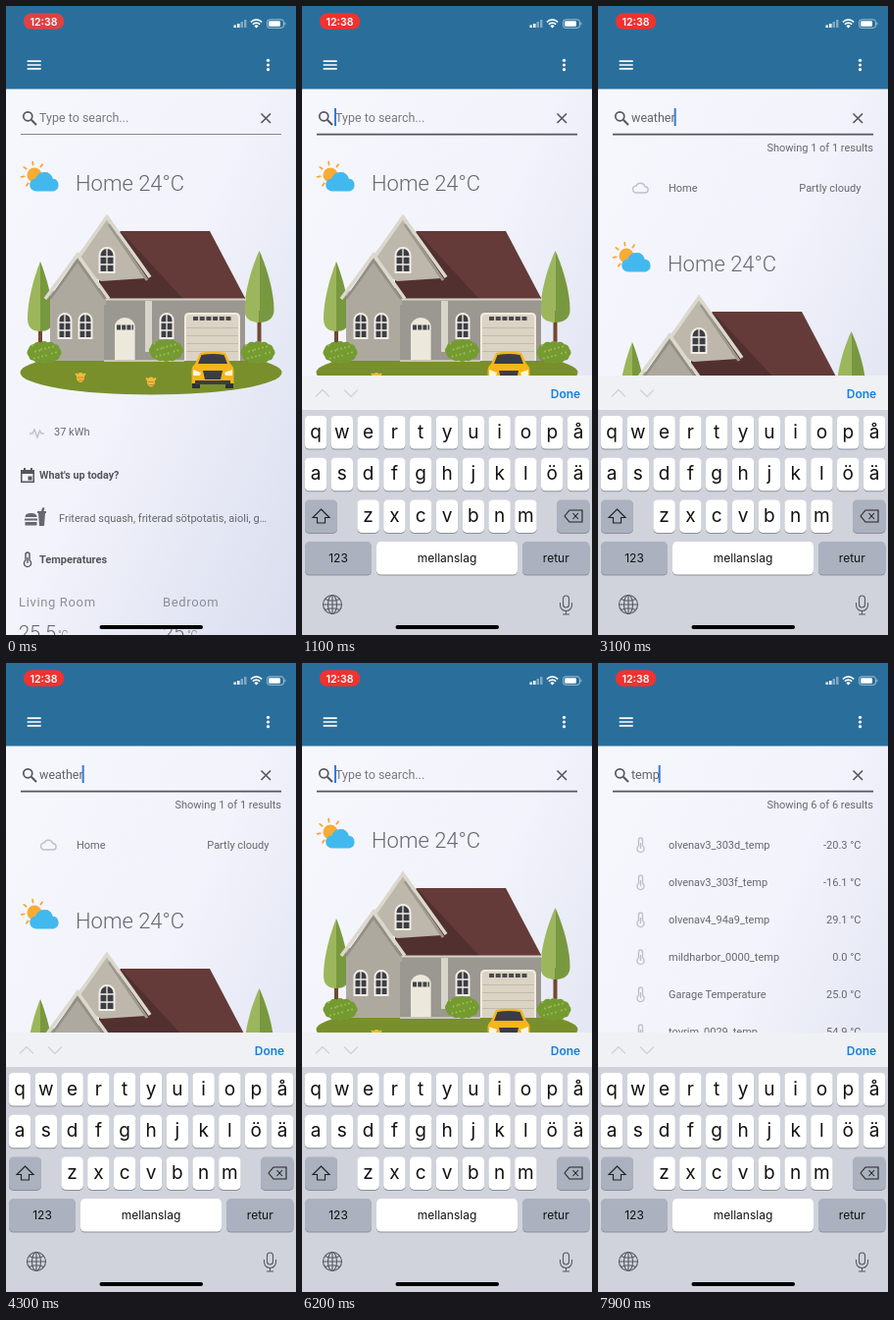
These frames come from a looping animation (296x640 px, 8000 ms). An HTML page:

```html
<!DOCTYPE html>
<html lang="sv">
<head>
<meta charset="utf-8">
<style>
html, body { margin: 0; height: 100%; overflow: hidden; }
svg { display: block; width: 296px; height: 640px; font: 11px Roboto, sans-serif; fill: #66686f; }
.ios { font-family: Inter, sans-serif; }
.line { fill: none; stroke: #bfc1c8; stroke-width: 1.4; }
.dark { stroke: #54565c; }
.end { text-anchor: end; }
.mid { text-anchor: middle; }
</style>
</head>
<body>
<svg viewBox="0 0 296 640">
  <defs>
    <linearGradient id="bg" x1="0" y1="0" x2="1" y2="1">
      <stop offset="0" stop-color="#f7f8fd"/><stop offset=".5" stop-color="#f2f3fb"/><stop offset="1" stop-color="#d9ddee"/>
    </linearGradient>
    <filter id="shadow" x="-30%" y="-30%" width="160%" height="160%">
      <feDropShadow dx="0" dy="1" stdDeviation="1" flood-opacity=".35"/>
    </filter>
  </defs>
  <rect width="296" height="640" fill="url(#bg)"/>

  <g id="home">
    <g stroke="#f7a832" stroke-width="1.8" stroke-linecap="round" id="rays"></g>
    <circle cx="29" cy="172" r="7.5" fill="#f9ab34"/>
    <path fill="#42b9ee" d="M31 188.500a6.500 6.500 0 0 1-.5-13a9 9 0 0 1 17.300.2a6.500 6.500 0 0 1 .7 12.800z"/>
    <text x="71" y="187.500" font-size="22" font-weight="300">Home 24°C</text>

    <ellipse cx="148" cy="373" rx="133.500" ry="22.500" fill="#788f2b"/>
    <g id="trees"></g>
    <path fill="#aea99f" d="M45 290H101V361H45z"/>
    <path fill="#9b9791" d="M100 296H244V361H100z"/>
    <path fill="#643b39" d="M117 229H208L245 299H95V270z"/>
    <path fill="#523030" d="M117 229L182 299H95V270z"/>
    <path fill="#d8d4ca" d="M100 297.500H245V299.500H100zM142 300H149V352H142z"/>
    <path fill="#bdb8ab" d="M103 217L143 277L97 280L66 262z"/>
    <path fill="none" stroke="#9d988d" stroke-width="3" d="M105 222L144 279"/>
    <path fill="none" stroke="#dcd8cd" stroke-width="3.500" d="M71 260L103 214.500L147 276"/>
    <path fill="#aea99f" d="M73 255L102 298V304H45V298z"/>
    <path fill="none" stroke="#938e85" stroke-width="2.500" d="M45 298L73 259L101 298"/>
    <path fill="none" stroke="#dcd8cd" stroke-width="3.500" d="M40 298L73 253L105 298"/>
    <g id="windows"></g>
    <path fill="#ece8dc" d="M111 361V326a10.300 9 0 0 1 20.600 0V361z"/>
    <path stroke="#444348" stroke-width="5" stroke-dasharray="4 1.200" d="M113 327H130"/>
    <path fill="#dbd3c4" stroke="#f0ebdf" stroke-width="2" d="M183 361V317Q183 313 187 313H234Q238 313 238 317V361"/>
    <path stroke="#c3baab" d="M184 327.500H237M184 335.500H237M184 343.500H237M184 351.500H237"/>
    <path stroke="#4a494d" stroke-width="4" stroke-dasharray="5 1.700" d="M191 318H231"/>
    <path fill="#c7c4bc" d="M100 360H182V362H100z"/>
    <g id="bushes"></g>

    <path fill="#303036" d="M190 376H198V389H190zM224 376H232V389H224z"/>
    <path fill="#f5b51b" d="M198 353Q211 350.500 224 353L229 364Q233 367 232.500 373V384H189.500V373Q189 367 193 364z"/>
    <path fill="#3b3d45" d="M199.500 355Q211 353 222.500 355L226 364H196zM201 371H221L219 380H203zM193 381H229V385H193z"/>
    <path fill="#fff6d8" d="M191 370L199 373L198 376H191zM231 370L223 373L224 376H231z"/>
    <g id="bees"></g>

    <path class="line" d="M24 435H27L29 431L32 439L34.500 432L36 435H39"/>
    <text x="49" y="437">37 kWh</text>
    <path fill="#54565c" fill-rule="evenodd" d="M15 472H18V470H20V472H25V470H27V472H29V485H15zM16.500 476V483.500H27.500V476zM22.500 478.500H26.500V482.500H22.500z"/>
    <path fill="#66686f" d="M19.500 520Q19.500 516 25.500 516T31.500 520zM19 521.500H32V523.500H19zM19.500 525H31.500V528.500H19.500zM32 514H36L37 510.500H39.500L38.500 514H41V516H40L39 529H34L33 516H32z"/>
    <g font-weight="700" fill="#54565c">
      <text x="34" y="481" font-size="10.800">What's up today?</text>
      <text x="34" y="567">Temperatures</text>
    </g>
    <text x="54" y="525">Friterad squash, friterad sötpotatis, aioli, g…</text>
    <g id="bulb"></g>
    <g font-size="13" letter-spacing=".65" fill="#8c8e96">
      <text x="13" y="611">Living Room</text><text x="160" y="611">Bedroom</text>
    </g>
    <g font-size="20" font-weight="300">
      <text x="13" y="645">25.5</text><text x="160" y="645">25</text>
      <text x="53" y="643" font-size="10">°C</text><text x="185" y="643" font-size="10">°C</text>
    </g>
  </g>

  <g id="results"></g>

  <rect width="296" height="84.500" fill="#2a6f9b"/>
  <rect id="pill" x="17.800" y="7.300" width="41.500" height="16.500" rx="8.200"/>
  <g fill="#fff">
    <text class="ios mid" x="38.500" y="19.500" font-size="10.700" font-weight="600">12:38</text>
    <path d="M21.700 55.300H35.700V56.900H21.700zM21.700 59.200H35.700V60.800H21.700zM21.700 63.100H35.700V64.700H21.700z"/>
    <circle cx="267.500" cy="55.300" r="1.600"/><circle cx="267.500" cy="60" r="1.600"/><circle cx="267.500" cy="64.700" r="1.600"/>
    <path d="M232.500 19.500H235V22H232.500zM236 18H238.500V22H236z"/>
    <path opacity=".4" d="M239.500 16H242V22H239.500zM243 14H245.500V22H243z"/>
    <path d="M255.500 22.500L253.300 20.200Q255.500 18.500 257.700 20.200z"/>
    <path fill="none" stroke="#fff" stroke-width="1.600" d="M251.800 18.700Q255.500 15.500 259.200 18.700M249.800 16.400Q255.500 11.500 261.200 16.400"/>
    <rect x="266.500" y="13.800" width="17" height="8.500" rx="2.500" fill="none" stroke="#fff" opacity=".55"/>
    <rect x="268" y="15.300" width="12" height="5.500" rx="1.200"/><path opacity=".6" d="M284.500 16.300Q286.500 18 284.500 19.800z"/>
  </g>

  <circle id="ripple" cx="265.500" cy="114" r="16" fill="#dfe0e5"/>
  <g class="line dark">
    <circle cx="22.300" cy="112.300" r="4.500" stroke-width="1.700"/>
    <path stroke-width="2" d="M25.800 115.800L31 121"/>
    <path stroke-width="1.600" d="M260.500 109.500L270 119M270 109.500L260.500 119"/>
    <path style="stroke:#85878c;stroke-width:1" d="M15 130.500H281"/>
    <path id="focus" style="stroke-width:1.6"/>
  </g>
  <text id="query" x="34" y="117.500" font-size="12.500"></text>
  <rect id="cursor" y="104" width="2" height="18" fill="#3b78d6"/>

  <g id="keyboard" class="ios mid" fill="#111">
    <path fill="#d0d3db" d="M0 376H296V640H0z"/>
    <path fill="#eff1f5" d="M0 376H296V411H0z"/>
    <path class="line" style="stroke:#d0d3d9" d="M14 397.500L21 390.500L28 397.500M43 390.500L50 397.500L57 390.500"/>
    <text x="269" y="398.500" font-size="12" font-weight="600" fill="#147ee0">Done</text>
    <g id="keys"></g>
    <g class="line" style="stroke:#222;stroke-width:1.1">
      <path d="M19.500 512L28 520.500H23.500V526H15.500V520.500H11z"/>
      <path d="M268 519L273 513H286V525H273zM276.500 516L282 522M282 516L276.500 522"/>
      <g style="stroke:#555960">
        <circle cx="31" cy="609" r="9.500"/><ellipse cx="31" cy="609" rx="4.500" ry="9.500"/>
        <path d="M31 599.500V618.500M21.500 609H40.500M23.500 603.500Q31 607 38.500 603.500M23.500 614.500Q31 611 38.500 614.500"/>
        <rect x="266.500" y="600" width="6" height="12" rx="3"/><path d="M263.500 607V609.500a6 6 0 0 0 12 0V607M269.500 615.500V619M266 619H273"/>
      </g>
    </g>
    <g id="popup" filter="url(#shadow)"><path fill="#fff"/><text font-size="28"></text></g>
  </g>
  <rect x="95.500" y="630" width="105.500" height="4" rx="2" fill="#000"/>
</svg>
<script>
const $ = id => document.getElementById(id);
const text = (x, y, s, attrs = '') => `<text x="${x}" y="${y}" ${attrs}>${s}</text>`;

// Scenery
$('rays').innerHTML = [...Array(8).keys()].map(i =>
  `<path d="M29 161.500V158.500" transform="rotate(${i * 45 - 8} 29 172)"/>`).join('');

const leafHalf = (x, top, w, h, fill) => `<path fill="${fill}" d="M${x} ${top}
  C${x + w * .45} ${top + h * .2} ${x + w} ${top + h * .55} ${x + w} ${top + h * .82}Q${x + w} ${top + h} ${x} ${top + h}z"/>`;
const tree = (x, top, w, h) => `<path fill="#70492f" d="M${x - 2} ${top + h - 12}h4v32h-4z"/>` +
  leafHalf(x, top, -w, h, '#9cb65c') + leafHalf(x, top, w, h, '#78983f');
$('trees').innerHTML = tree(35, 260, 13, 71) + tree(258.5, 249, 15, 73);

const pane = (x, y, w, h) => `
  <path fill="#3d3d44" stroke="#f0eee6" stroke-width="2" d="M${x - w} ${y + h}V${y + w}a${w} ${w} 0 0 1 ${2 * w} 0V${y + h}z"/>
  <path stroke="#f0eee6" stroke-width="1.3" d="M${x} ${y}v${h}M${x - w} ${y + h * .36}h${2 * w}M${x - w} ${y + h * .68}h${2 * w}"/>`;
$('windows').innerHTML = pane(103, 246, 7.5, 25) + [60, 81, 164].map(x => pane(x, 313, 6.5, 25)).join('');

const bush = (x, y) => {
  let out = `<ellipse cx="${x}" cy="${y}" rx="14" ry="10"/>`, dots = '';
  for (let i = 0; i < 12; i++) {
    const a = Math.PI * i / 6;
    out += `<circle cx="${x + 12.5 * Math.cos(a)}" cy="${y + 6.5 * Math.sin(a)}" r="5"/>`;
  }
  for (let i = 0; i < 13; i++)
    dots += `<circle cx="${x - 12 + i * 7 % 25}" cy="${y - 7 + i * 5 % 14}" r=".9"/>`;
  return `<g fill="#749b31">${out}<g fill="#a9c052">${dots}</g></g>`;
};
$('bushes').innerHTML = bush(39, 352.5) + bush(163.5, 350.5) + bush(257, 352.5);

$('bees').innerHTML = [[76, 378], [148, 382.5]].map(([x, y]) => `
  <path fill="none" stroke="#e8c03c" stroke-width="2" d="M${x - 5} ${y - 4}l3 3M${x + 5} ${y - 4}l-3 3"/>
  <ellipse cx="${x}" cy="${y}" rx="4" ry="5" fill="#f0bb3a"/>
  <path stroke="#c98a33" stroke-width="1.2" d="M${x - 3} ${y}h6M${x - 2} ${y + 3}h5"/>`).join('');

// Search results
const thermometer = (x, y, dark = '') => `<g class="line ${dark}">
  <path d="M${x - 2} ${y + 1}V${y - 5}a2 2 0 0 1 4 0V${y + 1}a3.600 3.600 0 1 1-4 0z"/><path d="M${x} ${y - 2}v6"/></g>`;
$('bulb').innerHTML = thermometer(22, 563, 'dark');

const toggle = (y, on) => `
  <rect x="240" y="${y - 5}" width="28" height="10" rx="5" fill="${on ? '#4d9ccb' : '#cfd1d8'}"/>
  <circle cx="${on ? 260.5 : 247}" cy="${y}" r="8.500" fill="#fafafa" filter="url(#shadow)"/>`;
const row = (y, label, value = '') => text(72, y + 4, label) + text(268.5, y + 4, value, 'class="end"');
const icon = d => `<path class="line" d="${d}"/>`;
const count = (n, all) => text(281, 148, `Showing ${n} of ${all} results`, 'class="end"');

const results = {
  none: '',
  weather: count(1, 1) + row(185, 'Home', 'Partly cloudy') +
    icon('M39 190a3.500 3.500 0 0 1 0-7a4.800 4.800 0 0 1 9 .8a3.100 3.100 0 0 1 0 6.200z'),
  many: count(10, 235) +
    row(185, 'Vacuum when nobody is home') + toggle(185.5, true) + icon('M35 180H47M35 184H47M35 188H43M47 185.500L51 188L47 190.500z') +
    row(223, 'Energy sensor', 'Home') + icon('M43 216V223M39.500 218.500a6 6 0 1 0 7 0') +
    row(261, 'Saturday') + toggle(261, false) + icon('M37 256H50V268H37zM37 258H50M40 253V256M47 253V256') +
    text(72, 301, 'device card', 'font-size="9.500"') + text(72, 319, 'Active', 'font-size="12.500"') +
    icon('M36 303.500H38M36 308.500H38M36 313.500H38M40 303.500H51M40 308.500H51M40 313.500H51') +
    '<path fill="#a5a7ad" d="M72 325.500H269V326.500H72zM255 314H263L259 318z"/>' +
    row(355, 'Start TV and set HDMI1 to input') + toggle(355, false) +
    '<path fill="#bfc1c8" d="M37 348H45L49 352V362H37z"/><path stroke="#f4f5fb" d="M39.500 355.500H46.500M39.500 358.500H44.500"/>',
  temp: count(6, 6) + [
    ['olvenav3_303d_temp', '-20.3'], ['olvenav3_303f_temp', '-16.1'], ['olvenav4_94a9_temp', '29.1'],
    ['mildharbor_0000_temp', '0.0'], ['Garage Temperature', '25.0'], ['tovrim_0029_temp', '54.9'],
  ].map(([name, value], i) => row(185 + i * 38, name, value + ' °C') + thermometer(43.5, 185 + i * 38)).join(''),
};
const homeShift = { none: 0, weather: 82, many: 480, temp: 480 };

// Keyboard
const rows = ['qwertyuiopå', 'asdfghjklöä', '  zxcvbnm'];
const rowTop = i => 417 + i * 42.7;
const keyX = i => 14 + i * 26.8;
const key = (x, y, w, fill, label, size, dy) => `
  <rect x="${x}" y="${y + 1}" width="${w}" height="33.500" rx="4.500" fill="#8b8f98"/>
  <rect x="${x}" y="${y}" width="${w}" height="33.500" rx="4.500" fill="${fill}"/>` +
  text(x + w / 2, y + dy, label, `font-size="${size}"`);
const grey = '#abb1be';
$('keys').innerHTML = rows.map((r, j) => [...r].map((c, i) =>
    c === ' ' ? '' : key(keyX(i) - 11.2, rowTop(j), 22.4, '#fff', c, 19, 22.5)).join('')).join('') +
  key(3, rowTop(2), 33, grey, '', 12, 20) + key(260, rowTop(2), 33.5, grey, '', 12, 20) +
  key(3, rowTop(3), 68, grey, '123', 12, 21) + key(76, rowTop(3), 144, '#fff', 'mellanslag', 12, 20.5) +
  key(225, rowTop(3), 68.5, grey, 'retur', 12, 20.5);

function showPopup(char) {
  $('popup').style.display = char ? '' : 'none';
  if (!char) return;
  const j = rows.findIndex(r => r.includes(char)), y = rowTop(j), x = keyX(rows[j].indexOf(char));
  const bx = Math.min(271, Math.max(24.5, x));
  const [path, label] = $('popup').children;
  path.setAttribute('d', `M${bx - 16} ${y - 51}H${bx + 16}q5.500 0 5.500 6V${y - 10}C${bx + 21} ${y + 2} ${x + 11} ${y - 2} ${x + 11} ${y + 10}
    V${y + 29}q0 4-4 4H${x - 7}q-4 0-4-4V${y + 10}C${x - 11} ${y - 2} ${bx - 21.5} ${y + 2} ${bx - 21.5} ${y - 10}V${y - 45}q0-6 5.500-6z`);
  label.setAttribute('x', bx - 1);
  label.setAttribute('y', y - 19);
  label.textContent = char;
}

// Timeline: [time, query, result list]
const FOCUS = 600, CLEAR = 5000;
const steps = [
  [0, '', 'none'], [FOCUS, '', 'none'], [1700, 'w', 'none'], [2000, 'we', 'weather'], [2250, 'wea', 'weather'],
  [2500, 'weat', 'weather'], [2700, 'weath', 'weather'], [2850, 'weathe', 'weather'], [2980, 'weather', 'weather'],
  [CLEAR, '', 'none'], [6500, 't', 'many'], [7050, 'te', 'many'], [7250, 'tem', 'temp'], [7450, 'temp', 'temp'],
];
const clamp = v => Math.min(1, Math.max(0, v));
const easeOut = p => 1 - (1 - clamp(p)) ** 3;
let shown;

function draw(t) {
  const [since, query, list] = steps.filter(s => s[0] <= t).pop();
  if (list !== shown) {
    $('results').innerHTML = results[shown = list];
    $('home').setAttribute('transform', `translate(0 ${homeShift[list]})`);
  }
  $('query').textContent = query || 'Type to search...';
  $('query').setAttribute('fill', query ? '#606268' : '#77797f');
  $('cursor').setAttribute('x', 33 + (query ? $('query').getComputedTextLength() : 0));
  $('cursor').style.display = t >= FOCUS && (t - since) % 1000 < 600 ? '' : 'none';

  const half = 133 * easeOut((t - (t < CLEAR ? FOCUS : CLEAR + 100)) / 250);
  $('focus').setAttribute('d', `M${148 - half} 130.600H${148 + half}`);
  $('ripple').style.opacity = t < CLEAR ? 0 : easeOut((t - CLEAR) / 100) * (1 - clamp((t - 5250) / 350));
  $('keyboard').setAttribute('transform', `translate(0 ${264 * (1 - easeOut((t - FOCUS) / 350))})`);
  showPopup(query && t - since < 110 && t - since > 0 && query !== 'weather' ? query.slice(-1) : '');

  const glow = clamp(t / 900);
  $('pill').setAttribute('fill', `rgb(${222 + 18 * glow},${66 - 16 * glow},${68 - 20 * glow})`);
}

function tick() {
  draw(performance.now() % 8000);
  requestAnimationFrame(tick);
}
tick();
</script>
</body>
</html>
```
